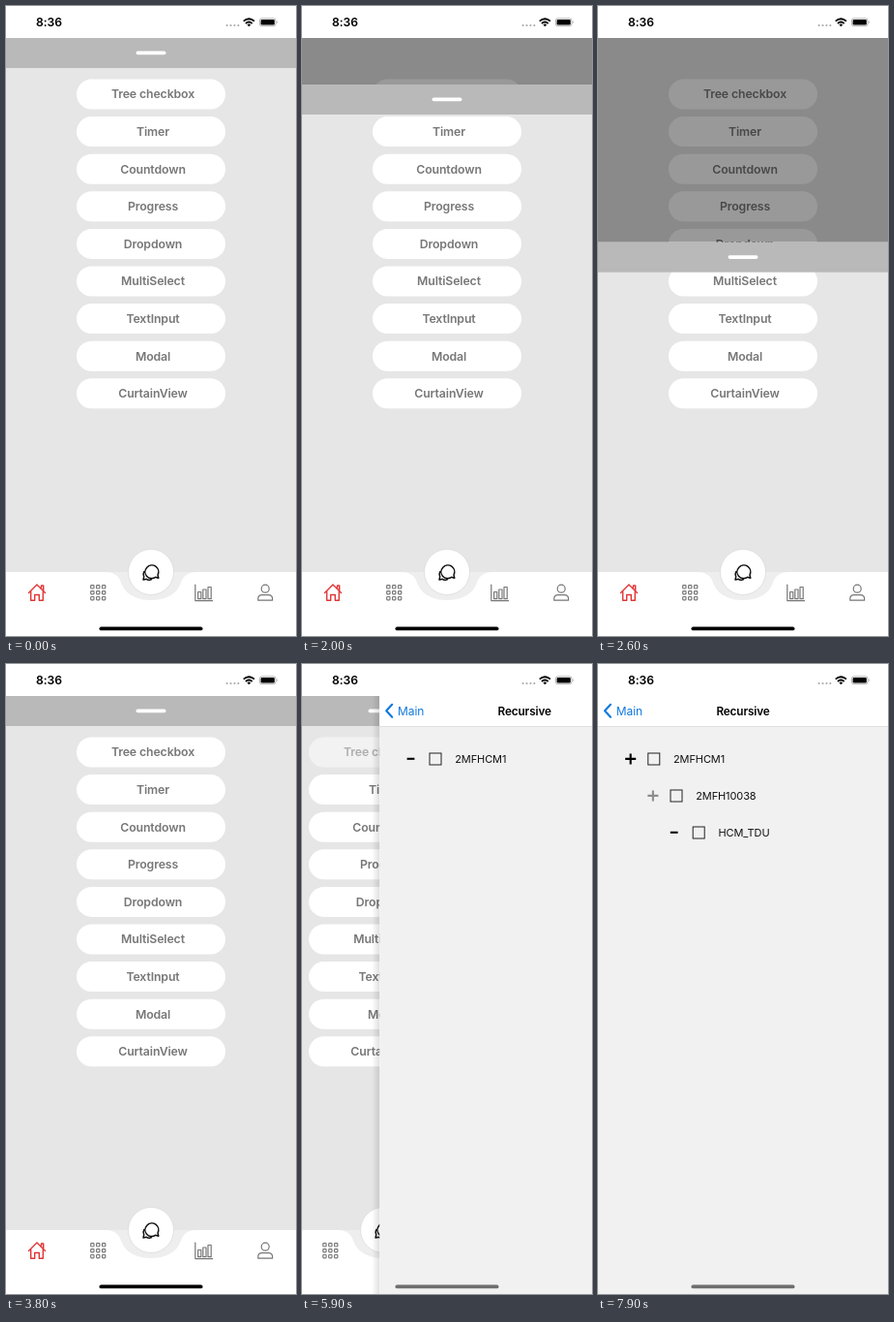
Recreate the animation shown at these times as an HTML page. Size 300 px wide and 650 px high, loop 8000 ms.

```html
<!DOCTYPE html>
<html lang="en">
<head>
<meta charset="utf-8">
<title>App components</title>
<style>
  html, body { margin: 0; width: 100%; height: 100%; overflow: hidden; background: #fff; }
  svg { display: block; width: 100%; height: 100%; }
  text { font-family: Inter, Roboto, "Liberation Sans", sans-serif; }
  .label { font-size: 12.3px; font-weight: 600; letter-spacing: -.12px; fill: #777; text-anchor: middle; }
  .node { font-size: 11px; letter-spacing: -.1px; fill: #111; }
  .title { font-size: 11.8px; font-weight: 600; letter-spacing: -.15px; text-anchor: middle; }
  .back { font-size: 12px; letter-spacing: -.1px; fill: #1079de; }
  .clock { font-size: 12.2px; font-weight: 600; letter-spacing: -.1px; }
  .line { fill: none; stroke: #777; stroke-width: 1.2; stroke-linecap: round; stroke-linejoin: round; }
</style>
</head>
<body>
<svg viewBox="0 0 300 650" preserveAspectRatio="none">
  <defs>
    <linearGradient id="edge">
      <stop offset="0" stop-color="#000" stop-opacity="0"/>
      <stop offset="1" stop-color="#000" stop-opacity=".12"/>
    </linearGradient>
  </defs>

  <g id="home">
    <rect y="33" width="300" height="617" fill="#e6e6e6"/>
    <g id="pills"></g>

    <rect id="shade" y="33" width="300" height="0" fill="#000" fill-opacity=".4"/>
    <g id="curtain">
      <rect y="33" width="300" height="31" fill="#b9b9b9"/>
      <rect x="134.5" y="46.6" width="31" height="3.6" rx="1.8" fill="#fff"/>
    </g>

    <rect x="103" y="584" width="94" height="30" fill="#eee"/>
    <path fill="#fff" d="M0 584H103C113 584 117 589 119 595C123 607 135 613 150 613S177 607 181 595C183 589 187 584 197 584H300V650H0Z"/>
    <circle cx="150" cy="584" r="23.5" fill="#fff" stroke="#d8d8d8" stroke-width=".7"/>

    <path class="line" style="stroke:#e03535;stroke-width:1.4" d="M23.5 605.5L32 597L40.500 605.500M36.500 601V598H38.700V603.500M25.700 604V613.300H29.700V607.500H34.300V613.300H38.300V604"/>
    <g id="grid" class="line"></g>
    <path class="line" style="stroke:#111;stroke-width:1.5" d="M145.500 588.200A6.900 6.900 0 1 1 157 587L157.800 590.300L154.600 589.300A6.900 6.900 0 0 1 145.500 588.200M142.800 583.600A5.200 5.200 0 0 0 142.700 588.800L142 592L145.200 591.300A5.600 5.600 0 0 0 150.500 591.600"/>
    <path class="line" d="M195.800 597V613.600H213.600M198.600 604.500H201.800V611.700H198.600ZM203.800 602H207V611.700H203.800ZM209 599.500H212.200V611.700H209Z"/>
    <path class="line" d="M272.200 601.200A4 4 0 1 1 264.200 601.200A4 4 0 1 1 272.200 601.200M260.800 613.200V611.600Q260.800 607.600 265 607.600H271.400Q275.600 607.600 275.600 611.600V613.200Z"/>
  </g>

  <g id="card">
    <rect x="-8" y="33" width="8" height="617" fill="url(#edge)"/>
    <rect y="33" width="300" height="617" fill="#f1f1f1"/>
    <rect y="33" width="300" height="31" fill="#fff"/>
    <rect y="64" width="300" height=".7" fill="#d9d9d9"/>
    <path d="M13 41.800L7 48.300L13 54.800" fill="none" stroke="#1079de" stroke-width="2.100" stroke-linecap="round" stroke-linejoin="round"/>
    <text class="back" x="18.800" y="52.700">Main</text>
    <text class="title" x="150" y="52.600">Recursive</text>
    <g id="tree"></g>
  </g>

  <g id="status">
    <rect width="300" height="33" fill="#fff"/>
    <text class="clock" x="31" y="21.200">8:36</text>
    <g id="signal" fill="#aaa"></g>
    <g fill="none" stroke="#000" stroke-width="1.700">
      <path d="M245.700 15.700Q251.300 10.800 256.900 15.700M247.900 18Q251.300 15 254.700 18"/>
      <path d="M249.400 19.300Q251.300 17.800 253.200 19.300L251.300 21.200Z" fill="#000" stroke="none"/>
    </g>
    <rect x="262.400" y="12.900" width="16.600" height="7.800" rx="2.300" fill="none" stroke="#999" stroke-width=".8"/>
    <rect x="263.600" y="14.100" width="14.200" height="5.400" rx="1.300"/>
    <path d="M280 15.300Q281.600 16.800 280 18.300Z" fill="#999"/>
  </g>
  <rect id="indicator" x="96.500" y="640.600" width="107" height="3.700" rx="1.850"/>
</svg>

<script>
  const LOOP = 8000, STEP = 100;
  const $ = id => document.getElementById(id);

  const names = ['Tree checkbox', 'Timer', 'Countdown', 'Progress', 'Dropdown',
    'MultiSelect', 'TextInput', 'Modal', 'CurtainView'];
  $('pills').innerHTML = names.map((name, i) => {
    const y = 75.5 + i * 38.6;
    return `<g><rect x="73" y="${y}" width="154" height="31" rx="15.5" fill="#fff"/>
      <text class="label" x="152" y="${y + 19.9}">${name}</text></g>`;
  }).join('');

  const cells = [0, 1, 2];
  $('grid').innerHTML = cells.map(r => cells.map(c =>
    `<rect x="${87.7 + c * 5.9}" y="${597.7 + r * 5.9}" width="3.3" height="3.3" rx=".8"/>`
  ).join('')).join('');

  $('signal').innerHTML = [0, 1, 2, 3].map(i =>
    `<circle cx="${228.6 + i * 3.9}" cy="20" r="1.1"/>`).join('');

  $('tree').innerHTML = ['2MFHCM1', '2MFH10038', 'HCM_TDU'].map((name, i) =>
    `<g transform="translate(${i * 23.2} ${i * 38})">
      <path class="sign" fill="none" stroke="#000" stroke-width="2.1"/>
      <rect x="51.8" y="92" width="12" height="12" fill="none" stroke="#222"/>
      <text class="node" x="78" y="102.1">${name}</text></g>`).join('');

  const pill = $('pills').firstElementChild;
  const rows = [...$('tree').children];
  const signs = rows.map(row => row.querySelector('.sign'));

  // Linear interpolation through [time, value] pairs
  function track(t, keys) {
    let i = keys.findIndex(k => k[0] > t);
    if (i < 0) return keys[keys.length - 1][1];
    if (i === 0) return keys[0][1];
    const [t0, a] = keys[i - 1], [t1, b] = keys[i];
    return a + (b - a) * (t - t0) / (t1 - t0);
  }

  const drop = [[1600, 0], [1700, 3.2], [1800, 13], [1900, 28], [2000, 48], [2100, 72],
    [2200, 99.4], [2300, 132], [2400, 165], [2500, 194], [2600, 210.7]];
  const press = [
    [[6900, 1], [7000, .42], [7100, .42], [7400, 1]],
    [[7600, 1], [7700, .42]]
  ];

  // Critically damped spring for the screen push
  function push(t) {
    if (t < 5800) return 0;
    if (t >= 6300) return 1;
    const x = 16.25 * (t - 5740) / 1000;
    return 1 - (1 + x) * Math.exp(-x);
  }

  const shift = (el, x, y) => el.setAttribute('transform', `translate(${x} ${y})`);

  function draw(t) {
    const fall = t < 3800 ? track(t, drop) : 0;
    shift($('curtain'), 0, fall);
    $('shade').setAttribute('height', fall);
    pill.setAttribute('opacity', t >= 5600 ? .5 : 1);

    const p = push(t);
    shift($('home'), -90 * p, 0);
    shift($('card'), 300 * (1 - p), 0);
    $('card').style.display = p ? '' : 'none';
    $('indicator').setAttribute('fill', p ? '#6e6e6e' : '#000');

    const open = [t >= 7100, t >= 7900, false];
    rows.forEach((row, i) => {
      row.style.display = i === 0 || open[i - 1] ? '' : 'none';
      signs[i].setAttribute('d', open[i] ? 'M28.2 97.9H39.2M33.7 92.4V103.4' : 'M28.4 97.8H36.2');
      signs[i].setAttribute('opacity', press[i] ? track(t, press[i]) : 1);
    });
  }

  const start = performance.now();
  function tick() {
    const t = (performance.now() - start) % LOOP;
    draw(Math.floor(t / STEP) * STEP);
    requestAnimationFrame(tick);
  }
  tick();
</script>
</body>
</html>
```
